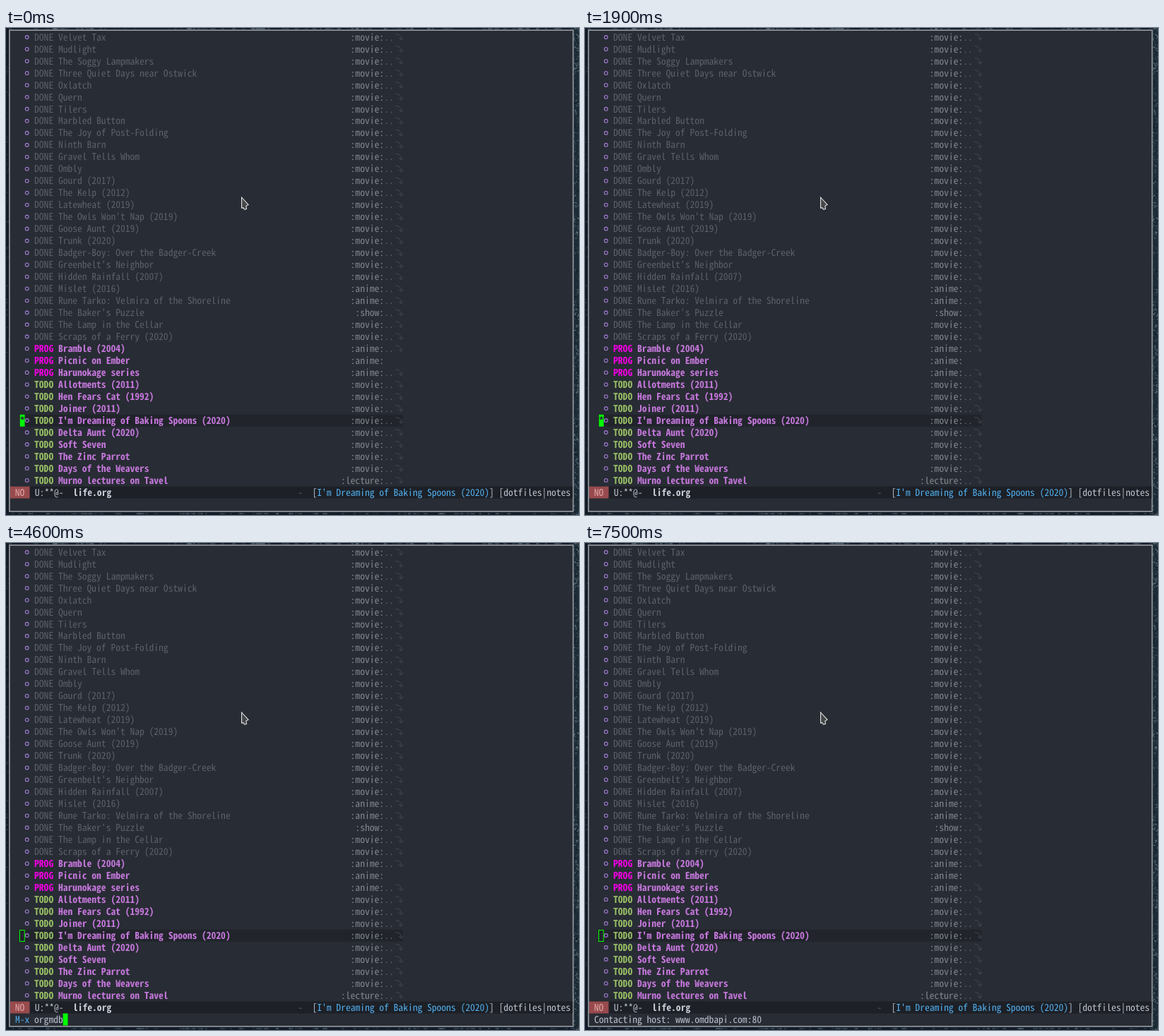
These frames come from a looping animation (811 by 690 pixels, 8 s). An HTML page with a canvas:

```html
<!DOCTYPE html>
<html lang="en">
<head>
<meta charset="utf-8">
<title>Org list</title>
<style>
html, body { margin: 0; width: 100%; height: 100%; overflow: hidden; background: #0e1722; }
canvas { display: block; }
</style>
</head>
<body>
<canvas id="stage" width="811" height="690"></canvas>
<script>
const W = 811, H = 690, LOOP = 8000;
const CELL = 6.77, LINE = 16.97, LEFT = 13, TOP = 4.7, CURRENT = 32;
const FAMILY = '"Noto Sans Mono CJK JP", "Noto Sans Mono", "DejaVu Sans Mono", monospace';
const C = {
  bg: '#282c34', bar: '#1d2026', line: '#21242b', region: '#43464c',
  fg: '#bbc2cf', dim: '#5b6268', tag: '#82888f', fold: '#454a52',
  blue: '#51afef', violet: '#c678dd', bullet: '#a47fd8',
  PROG: '#ee00e0', TODO: '#98be65', green: '#00ff00', orange: '#ffa500'
};
const FOCUS = "I'm Dreaming of Baking Spoons (2020)";
const titles = [
  'Velvet Tax', 'Mudlight', 'The Soggy Lampmakers', 'Three Quiet Days near Ostwick',
  'Oxlatch', 'Quern', 'Tilers', 'Marbled Button', 'The Joy of Post-Folding',
  'Ninth Barn', 'Gravel Tells Whom', 'Ombly', 'Gourd (2017)', 'The Kelp (2012)',
  'Latewheat (2019)', "The Owls Won't Nap (2019)", 'Goose Aunt (2019)', 'Trunk (2020)',
  'Badger-Boy: Over the Badger-Creek', "Greenbelt's Neighbor", 'Hidden Rainfall (2007)',
  'Mislet (2016)', 'Rune Tarko: Velmira of the Shoreline', "The Baker's Puzzle",
  'The Lamp in the Cellar', 'Scraps of a Ferry (2020)',
  'Bramble (2004)', 'Picnic on Ember', 'Harunokage series',
  'Allotments (2011)', 'Hen Fears Cat (1992)', 'Joiner (2011)', FOCUS,
  'Delta Aunt (2020)', 'Soft Seven', 'The Zinc Parrot', 'Days of the Weavers',
  'Murno lectures on Tavel'
];
const tags = { 21: 'anime', 22: 'anime', 23: 'show', 26: 'anime', 27: 'anime', 28: 'anime', 37: 'lecture' };
const UNFOLDED = 27;

const COMMAND = 'orgmdb-movie-properties';
// Time of each keystroke; the last one completes the command.
const keys = [3600, 3800, 4100, 4200, 4400, 4600, 4800, 5100, 5500, 5600, 5900, 6000, 6300, 6500, 6600];
const PROMPT = 3500, COMPLETE = 6800, CONTACT = 7500;

const ctx = document.getElementById('stage').getContext('2d');
ctx.textRendering = 'geometricPrecision';
ctx.font = '100px ' + FAMILY;
const size = 100 * CELL / ctx.measureText('M').width;

const rowTop = row => TOP + row * LINE;
const colX = col => LEFT + col * CELL;

function box(x, y, w, h, color) {
  ctx.fillStyle = color;
  ctx.fillRect(x, y, w, h);
}

function text(str, x, row, color, bold) {
  ctx.font = (bold ? 'bold ' : '') + size + 'px ' + FAMILY;
  ctx.fillStyle = color;
  for (let i = 0; i < str.length; i++) {
    if (str[i] !== ' ') ctx.fillText(str[i], x + i * CELL, rowTop(row) + 13);
  }
}

function path(points, close) {
  ctx.beginPath();
  points.forEach(([x, y]) => ctx.lineTo(x, y));
  if (close) ctx.closePath();
}

function wallpaper() {
  let seed = 7;
  const rnd = () => (seed = seed * 16807 % 2147483647) / 2147483647;
  box(0, 0, W, H, '#121c28');
  box(803, 0, 8, H, '#1d2c37');
  ctx.lineWidth = 1.2;
  for (let i = 0; i < 900; i++) {
    const right = rnd() < 0.8;
    const x = right ? 803 + rnd() * 8 : rnd() * 4, y = rnd() * H;
    const shade = rnd() < 0.35 ? '8,16,24' : '125,148,155';
    ctx.strokeStyle = `rgba(${shade},${rnd() * (right ? 0.7 : 0.25)})`;
    path([[x, y], [x + rnd() * 6 - 3, y + rnd() * 5 - 2]]);
    ctx.stroke();
  }
  for (let i = 0; i < 260; i++) {
    box(rnd() * W, rnd() < 0.5 ? 0 : 687, 2 + rnd() * 5, 2, `rgba(110,130,140,${rnd() * 0.4})`);
  }
}

function foldMark(row, dots, arrow) {
  const x = colX(79) + 2.5, y = rowTop(row) + 8;
  text('..', colX(77) + 1, row, dots);
  ctx.strokeStyle = arrow;
  ctx.lineWidth = 1;
  ctx.beginPath();
  ctx.moveTo(x + 1, y - 4);
  ctx.bezierCurveTo(x + 6, y - 4, x + 9, y - 2, x + 9, y + 4);
  ctx.stroke();
  path([[x + 5.5, y + 1.5], [x + 9, y + 4.5], [x + 11.5, y + 1]]);
  ctx.stroke();
}

function heading(title, row, selected) {
  const state = row < 26 ? 'DONE' : row < 29 ? 'PROG' : 'TODO';
  const open = state !== 'DONE';
  ctx.strokeStyle = C.bullet;
  ctx.lineWidth = 1.1;
  ctx.beginPath();
  ctx.arc(colX(2.5) - 0.2, rowTop(row) + 8.3, 2.4, 0, Math.PI * 2);
  ctx.stroke();
  text(state, colX(4), row, open ? C[state] : C.dim, open);
  text(title, colX(9), row, open ? C.violet : C.dim, open);
  const tag = `:${tags[row] || 'movie'}:`;
  text(tag, colX(77 - tag.length) + 0.7, row, C.tag);
  if (row !== UNFOLDED) foldMark(row, selected ? C.tag : C.dim, selected ? C.tag : C.fold);
}

function currentLine(visual) {
  const x = colX(1);
  box(x, rowTop(CURRENT), (visual ? 795 : colX(81)) - x, LINE, visual ? C.region : C.line);
}

function point(visual, hollow) {
  const x = colX(1), y = rowTop(CURRENT);
  if (hollow) {
    ctx.strokeStyle = C.green;
    ctx.lineWidth = 1;
    ctx.strokeRect(x - 0.3, y + 0.8, CELL, LINE - 1);
  } else {
    box(x, y, CELL, LINE, visual ? C.orange : C.green);
    text('*', x, CURRENT, C.bg, true);
  }
}

function modeLine(visual) {
  const row = 38, y = rowTop(row), at = col => 7 + col * CELL;
  box(6, y, 796, LINE, C.bar);
  box(6, y, 27.5, LINE, visual ? '#8c5c3c' : '#984a4d');
  text(visual ? 'VL' : 'NO', at(1) - 1, row, visual ? '#e0bf9c' : '#e4aaa8');
  text('U:**@-', at(5), row, C.fg);
  text('life.org', at(13), row, '#c8ced9', true);
  text('-', at(60), row, C.dim);
  text('[', at(63), row, C.fg);
  text(FOCUS, at(64), row, C.blue);
  text('] [dotfiles|notes', at(64 + FOCUS.length), row, C.fg);
}

function echoArea(t) {
  const row = 39;
  if (t >= 700 && t < 1900) {
    text('-- VISUAL LINE --', LEFT, row, C.fg);
  } else if (t >= CONTACT) {
    text('Contacting host: www.omdbapi.com:80', LEFT, row, C.fg);
  } else if (t >= PROMPT) {
    const n = t >= COMPLETE ? COMMAND.length : keys.filter(k => k <= t).length;
    text('M-x', LEFT, row, C.blue);
    text(COMMAND.slice(0, n), colX(4), row, C.fg);
    box(colX(4 + n), rowTop(row), CELL, LINE, C.green);
  }
}

function mouse() {
  path([[333.5, 240], [343, 250.4], [339.9, 252], [340.4, 256.4],
    [337.6, 257.2], [335.8, 254.6], [333.5, 255]], true);
  ctx.fillStyle = '#45474a';
  ctx.fill();
  ctx.strokeStyle = '#e6e6e6';
  ctx.lineWidth = 1.1;
  ctx.stroke();
}

function draw(t) {
  const visual = t >= 800 && t < 1900;
  wallpaper();
  box(4, 2.2, 799.6, 683.6, '#8c9097');
  box(5.8, 4, 796, 680, C.bg);
  currentLine(visual);
  titles.forEach((title, row) => heading(title, row, visual && row === CURRENT));
  point(visual, t >= PROMPT);
  modeLine(visual);
  echoArea(t);
  mouse();
}

const start = performance.now();
function tick() {
  draw((performance.now() - start) % LOOP);
  requestAnimationFrame(tick);
}
tick();
</script>
</body>
</html>
```
